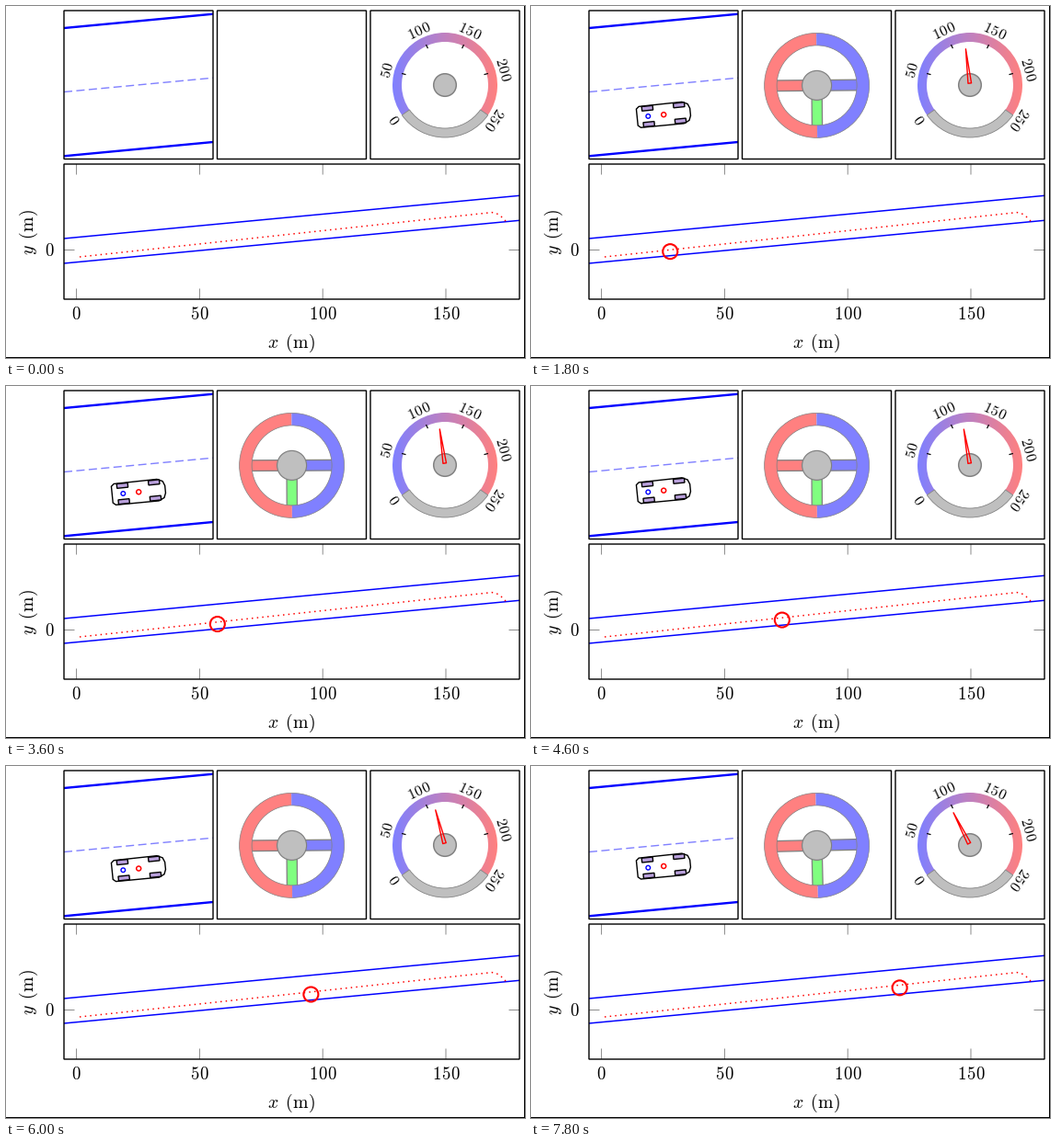
A matplotlib script for the animation above (8 s loop, 564 by 383 pixels).

```python
import numpy as np
import matplotlib.pyplot as plt
from matplotlib.animation import FuncAnimation
from matplotlib.colors import LinearSegmentedColormap
from matplotlib.patches import Circle, Polygon, Rectangle, Wedge
from matplotlib.transforms import Affine2D

W, H, DPI = 564, 383, 96
PX = 72 / DPI                      # one pixel in points
STEP, COUNT = 200, 40
RED, BLUE, GREEN = "#ff8080", "#8080ff", "#80ff80"
SILVER, GRAY = "#bfbfbf", "#808080"

plt.rcParams["mathtext.fontset"] = "cm"
plt.rcParams["path.snap"] = False
fig = plt.figure(figsize=(W / DPI, H / DPI), dpi=DPI, facecolor="white")
ax = fig.add_axes([0, 0, 1, 1])
ax.axis("off")


def line(xs, ys, color="black", lw=1.0, **kw):
    kw.setdefault("solid_capstyle", "butt")
    return ax.plot(xs, ys, color=color, lw=lw * PX, **kw)[0]


def frame_box(x0, y0, x1, y1):
    ax.add_patch(Rectangle((x0, y0), x1 - x0, y1 - y0, fill=False,
                           ec="black", lw=1.4 * PX, zorder=5))


def label(x, y, s, size, rot=0):
    ax.text(x, y, f"${s}$", fontsize=size * PX, rotation=rot,
            ha="center", va="center")


def number(x, y, n, size, rot=0, track=0.04):
    label(x, y, rf"\hspace{{{track}}}".join(str(n)), size, rot)


def polar(center, r, deg):
    a = np.radians(deg)
    return center[0] + r * np.cos(a), center[1] - r * np.sin(a)


def part(patch, group, move=None):
    """Add a patch that follows a movable transform."""
    if move is not None:
        patch.set_transform(move + ax.transData)
    ax.add_patch(patch)
    group.append(patch)


# page edges and panels
line([W - 0.5, W - 0.5], [0, H])
line([0, W], [H - 0.5, H - 0.5])
for left in (63, 229.5, 396):
    frame_box(left, 5, left + 162, 166.5)
frame_box(63, 172, 558, 319)

# close-up of the road
line([63, 225], [24, 8.7], "blue", 2.4)
line([63, 225], [93.5, 78.2], BLUE, 1.4, dashes=(9 / 1.4, 4.5 / 1.4))
line([63, 225], [163.3, 148], "blue", 2.4)

# overview plot
for v in (0, 50, 100, 150):
    x = 76.6 + 2.676 * v
    line([x, x], [172, 183.5], GRAY, 0.9)
    line([x, x], [307.5, 319], GRAY, 0.9)
    number(x, 335.8, v, 18.8)
line([63, 74.5], [265.5, 265.5], GRAY, 0.9)
line([546.5, 558], [265.5, 265.5], GRAY, 0.9)
number(47, 266, 0, 18.8)
UNIT = r"\hspace{0.45}(\hspace{0.03}\mathrm{m}\hspace{0.03})"
label(310.5, 367.3, "x" + UNIT, 19.8)
label(24.5, 246, "y" + UNIT, 19.8, 90)
line([63, 558], [253, 206.3], "blue", 1.5)
line([63, 558], [280, 233.3], "blue", 1.5)
line([80, 528, 533, 538, 543], [273, 224.6, 225.6, 229, 234], "red", 1.5,
     dashes=(1, 2.8), dash_capstyle="butt")

# speedometer, one degree per unit
DIAL = (477, 86)
fade = LinearSegmentedColormap.from_list("fade", [BLUE, RED])
band = Wedge(DIAL, 57, 145, 395, width=10, transform=ax.transData)
ramp = ax.imshow(np.linspace(0, 1, 256)[None, :], cmap=fade, aspect="auto",
                 extent=(DIAL[0] - 57, DIAL[0] + 57, 143.5, 28.5), zorder=1)
ramp.set_clip_path(band)
ax.add_patch(Wedge(DIAL, 57, 35, 145, width=10, fc=SILVER, ec=GRAY,
                   lw=0.8 * PX))
ax.add_patch(Circle(DIAL, 12.3, fc=SILVER, ec=GRAY, lw=1.5 * PX))
for v in range(0, 251, 50):
    if 0 < v < 250:
        line(*zip(polar(DIAL, 48.5, 215 - v), polar(DIAL, 44, 215 - v)), lw=1.2)
    number(*polar(DIAL, 64.5, 215 - v), v, 16, 125 - v, 0.06)

moving = []

# steering wheel
turn = Affine2D()
for x, y, w, h, color in ((-44, -5.8, 30, 11.6, RED), (14, -5.8, 30, 11.6, BLUE),
                          (-5.6, 14, 11.2, 30, GREEN)):
    part(Rectangle((x, y), w, h, fc=color, ec=GRAY, lw=1.3 * PX), moving, turn)
for start, color in ((90, RED), (-90, BLUE)):
    part(Wedge((0, 0), 57, start, start + 180, width=13.5, fc=color, lw=0),
         moving, turn)
for r in (57, 43.5):
    part(Circle((0, 0), r, fill=False, ec=GRAY, lw=0.7 * PX), moving, turn)
part(Circle((0, 0), 16, fc=SILVER, ec=GRAY, lw=1.2 * PX), moving, turn)

# car
drive = Affine2D()
side = [(-29, 9), (-26, 11.5), (21, 11.8), (27, 9), (29, 4)]
hull = side + [(x, -y) for x, y in reversed(side)]
part(Polygon(hull, fill=False, ec="black", lw=1.4 * PX), moving, drive)
for x in (-17, 17.5):
    for y in (-8.7, 8.7):
        part(Rectangle((x - 6, y - 2.4), 12, 4.8, fc="#b9a0dc", ec="black",
                       lw=1.4 * PX), moving, drive)
part(Circle((-17, 0), 2.3, fill=False, ec="blue", lw=1.4 * PX), moving, drive)
part(Circle((0, 0), 2.5, fill=False, ec="red", lw=1.5 * PX), moving, drive)

# needle and position marker
needle = Polygon([(0, 0), (1, 0), (0, 1)], fill=False, ec="red",
                 lw=1.4 * PX, joinstyle="round", zorder=4)
marker = Circle((0, 0), 8, fill=False, ec="red", lw=2.1 * PX, zorder=4)
part(needle, moving)
part(marker, moving)

# speed over time; distance is its running sum
times = np.arange(COUNT) * STEP
speed = np.interp(times, [200, 1000, 2600, 3600, 4600, 5300, 6000, 6900, 7800],
                  [119.8, 119, 117.7, 116.7, 115.3, 113.2, 110, 104.5, 98])
pos = np.cumsum(speed) * 0.0743
pos += 116 - pos[5]
steer = np.interp(times, [200, 1000, 2400, 4800, 6000, 7800],
                  [1.2, 0.8, 0.3, 0.3, 0.5, 1.3])


def draw(i):
    for p in moving:
        p.set_visible(i > 0)
    x = pos[i]
    marker.center = (x, 274.5 - 0.1035 * (x - 80.2))
    drive.clear().rotate_deg(-5.8).translate(144.2, 119.5 - 0.037 * (x - 116))
    turn.clear().rotate_deg(-steer[i]).translate(310.6, 86.4)
    a = 215 - speed[i]
    base = polar(DIAL, 2, a)
    needle.set_xy([polar(DIAL, 39.5, a), polar(base, 1.8, a + 90),
                   polar(base, 1.8, a - 90)])
    return moving


ax.set_xlim(0, W)
ax.set_ylim(H, 0)
anim = FuncAnimation(fig, draw, frames=COUNT, interval=STEP, repeat=True,
                     repeat_delay=0, blit=False)
plt.show()
```
